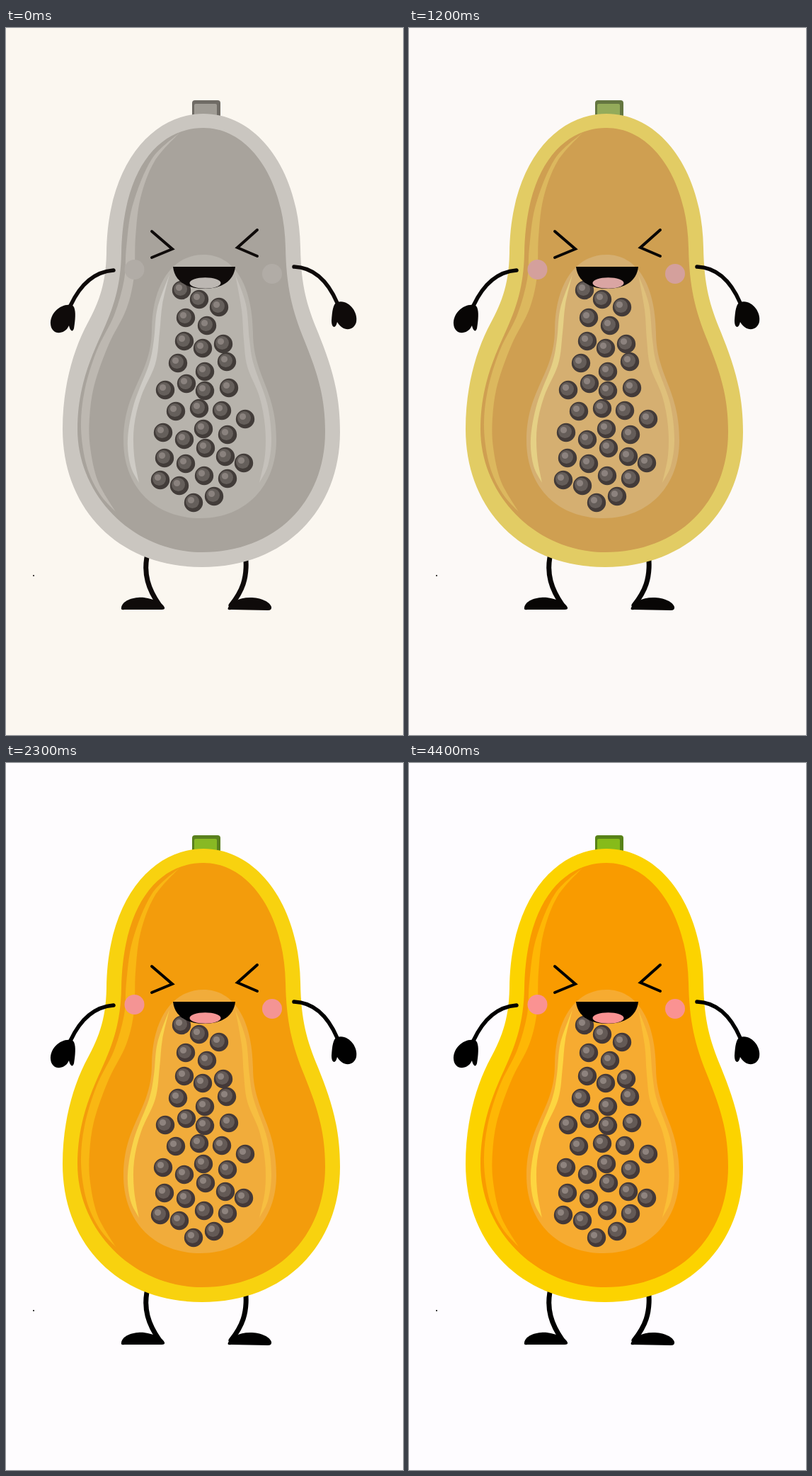
Animation of 561 by 998 pixels, one loop 4.5 s. Source, as an HTML page:

```html
<!DOCTYPE html>
<html lang="en">
<head>
<meta charset="utf-8">
<title>Papaya</title>
<style>
  html, body { margin: 0; width: 100%; height: 100%; overflow: hidden; background: var(--paper); }
  svg { display: block; width: 100%; height: 100%; }
  .line { fill: none; stroke: var(--ink); stroke-linecap: round; stroke-linejoin: miter; }
</style>
</head>
<body>
<svg id="stage" viewBox="0 0 561 998" preserveAspectRatio="none"></svg>
<script>
const LOOP = 4500, STEP = 100, FADE = 2500;

// Each part goes from its faded colour to its full colour.
const COLORS = {
  paper:  [[251, 247, 240], [254, 252, 255]],
  ink:    [[15, 11, 10], [0, 0, 0]],
  rind:   [[202, 198, 192], [252, 211, 0]],
  flesh:  [[168, 163, 156], [249, 155, 0]],
  stripe: [[189, 184, 177], [254, 183, 5]],
  pulp:   [[183, 179, 172], [246, 171, 49]],
  shine:  [[206, 203, 197], [253, 213, 64]],
  glow:   [[197, 193, 187], [251, 190, 54]],
  blush:  [[177, 172, 166], [250, 146, 146]],
  tongue: [[188, 183, 178], [250, 146, 146]],
  stem:   [[111, 107, 101], [88, 130, 24]],
  leaf:   [[160, 156, 149], [134, 187, 26]],
  seed:   [[66, 60, 57], [68, 57, 56]],
  seedMid:   [[101, 95, 91], [100, 90, 86]],
  seedShine: [[138, 130, 126], [142, 131, 126]]
};

const SEEDS = [
  [248, 370], [273, 383], [301, 394], [254, 409], [284, 420], [252, 442], [278, 452],
  [307, 446], [243, 473], [312, 471], [281, 485], [255, 502], [225, 511], [281, 512],
  [315, 508], [240, 541], [273, 537], [305, 540], [338, 552], [222, 571], [252, 581],
  [279, 566], [313, 574], [282, 593], [224, 607], [254, 615], [310, 605], [336, 614],
  [218, 638], [245, 646], [280, 632], [313, 636], [265, 670], [294, 661]
];

const shape = (d, color) => `<path d="${d}" fill="var(--${color})"/>`;
const line = (d, width) => `<path class="line" d="${d}" stroke-width="${width}"/>`;
const dot = (x, y, r, color) => `<circle cx="${x}" cy="${y}" r="${r}" fill="var(--${color})"/>`;

// Smooth cubic segments through a list of points.
function smooth(text) {
  const p = text.split(" ").map(s => s.split(",").map(Number));
  let d = "";
  for (let i = 0; i < p.length - 1; i++) {
    const a = p[i - 1] || p[i], b = p[i], c = p[i + 1], e = p[i + 2] || c;
    d += `C${b[0] + (c[0] - a[0]) / 6} ${b[1] + (c[1] - a[1]) / 6}` +
         ` ${c[0] - (e[0] - b[0]) / 6} ${c[1] - (e[1] - b[1]) / 6} ${c[0]} ${c[1]}`;
  }
  return d;
}

// Tapered band: one edge down, the other edge back up.
const band = (down, up, color) =>
  shape("M" + down.split(" ")[0] + smooth(down) + smooth(up) + "Z", color);

const limbs =
  line("M202 735C191 770 203 795 217 815", 7) +
  line("M338 740C343 778 332 797 318 815", 7) +
  shape("M163 818C165 808 180 803 195 804C210 806 222 812 224 818Q225 821 220 821L167 821Q162 822 163 818Z", "ink") +
  shape("M314 818C317 812 328 804 345 804C360 804 373 810 375 817Q376 822 370 822L318 821Q312 822 314 818Z", "ink");

const stem =
  '<rect x="263" y="102" width="40" height="40" rx="4" fill="var(--stem)"/>' +
  '<rect x="266" y="107" width="32" height="35" rx="2" fill="var(--leaf)"/>';

const body =
  shape("M279 121C208 121 143 191 142 318C141 365 130 390 111 425C93 462 80 510 80 566C80 680 160 761 277 761C395 761 472 680 472 570C472 510 457 470 441 430C425 391 417 365 416 310C414 200 355 121 279 121Z", "rind") +
  shape("M279 141C215 141 165 200 163 318C162 365 152 395 135 432C115 475 101 515 101 566C101 660 180 740 277 740C380 740 451 670 451 570C451 515 437 480 422 442C404 398 396 365 395 310C393 215 345 141 279 141Z", "flesh") +
  band("245,148 206,185 179,250 170,310 167,355 153,405 128,456 111,512 106,565 114,618 132,657 155,683",
       "155,683 130,640 119,592 118,550 125,503 145,447 170,397 181,350 183,295 190,240 210,188 245,148", "stripe") +
  shape("M279 320C235 320 207 362 206 425C206 490 166 510 166 582C166 648 210 692 275 692C340 692 382 645 382 582C382 510 349 490 349 430C348 362 322 320 279 320Z", "pulp") +
  band("231,348 214,395 209,440 202,475 181,530 172,580 176,618 188,642",
       "188,642 181,603 181,562 191,520 211,474 217,430 221,390 231,348", "shine") +
  band("324,348 339,390 344,440 350,475 369,530 375,580 370,618 358,642",
       "358,642 366,603 366,562 358,520 341,478 336,440 333,398 324,348", "glow");

const seeds = SEEDS.map(([x, y]) =>
  dot(x, y, 13.2, "seed") + dot(x - 1.5, y - 1.5, 9.5, "seedMid") + dot(x - 3.5, y - 3.5, 4.6, "seedShine")
).join("");

const face =
  dot(181.5, 341, 14, "blush") + dot(376, 347, 14, "blush") +
  line("M206 287L235 312L206 324", 4) +
  line("M355 285L327 310L355 322", 4) +
  shape("M236 337H324C322 357 305 368 280 368C255 368 238 357 236 337Z", "ink") +
  '<ellipse cx="281.5" cy="360" rx="22" ry="7.7" fill="var(--tongue)"/>';

const arms =
  line("M152 342C125 344 105 362 91 392", 5.5) +
  shape("M91 391C78 389 62 402 63 418C64 431 77 434 86 425Q88 422 89 420C90 426 94 431 96 424C97 418 99 404 97 397Q96 391 91 391Z", "ink") +
  line("M407 337C435 338 455 358 468 388", 5.5) +
  shape("M468 387C462 389 461 400 460 413C460 424 466 425 468 415C475 428 491 429 495 415C498 400 483 382 468 387Z", "ink");

document.getElementById("stage").innerHTML =
  limbs + stem + body + seeds + face + arms + dot(39, 773, 1, "ink");

const root = document.documentElement.style;
const start = performance.now();
let shown = -1;

function paint(now) {
  const t = Math.floor((Math.max(0, now - start) % LOOP) / STEP) * STEP;
  if (t !== shown) {
    shown = t;
    const k = Math.min(1, t / FADE);
    for (const [name, [from, to]] of Object.entries(COLORS)) {
      const mix = from.map((v, i) => Math.round(v + (to[i] - v) * k));
      root.setProperty("--" + name, `rgb(${mix})`);
    }
  }
  requestAnimationFrame(paint);
}
paint(start);
</script>
</body>
</html>
```
